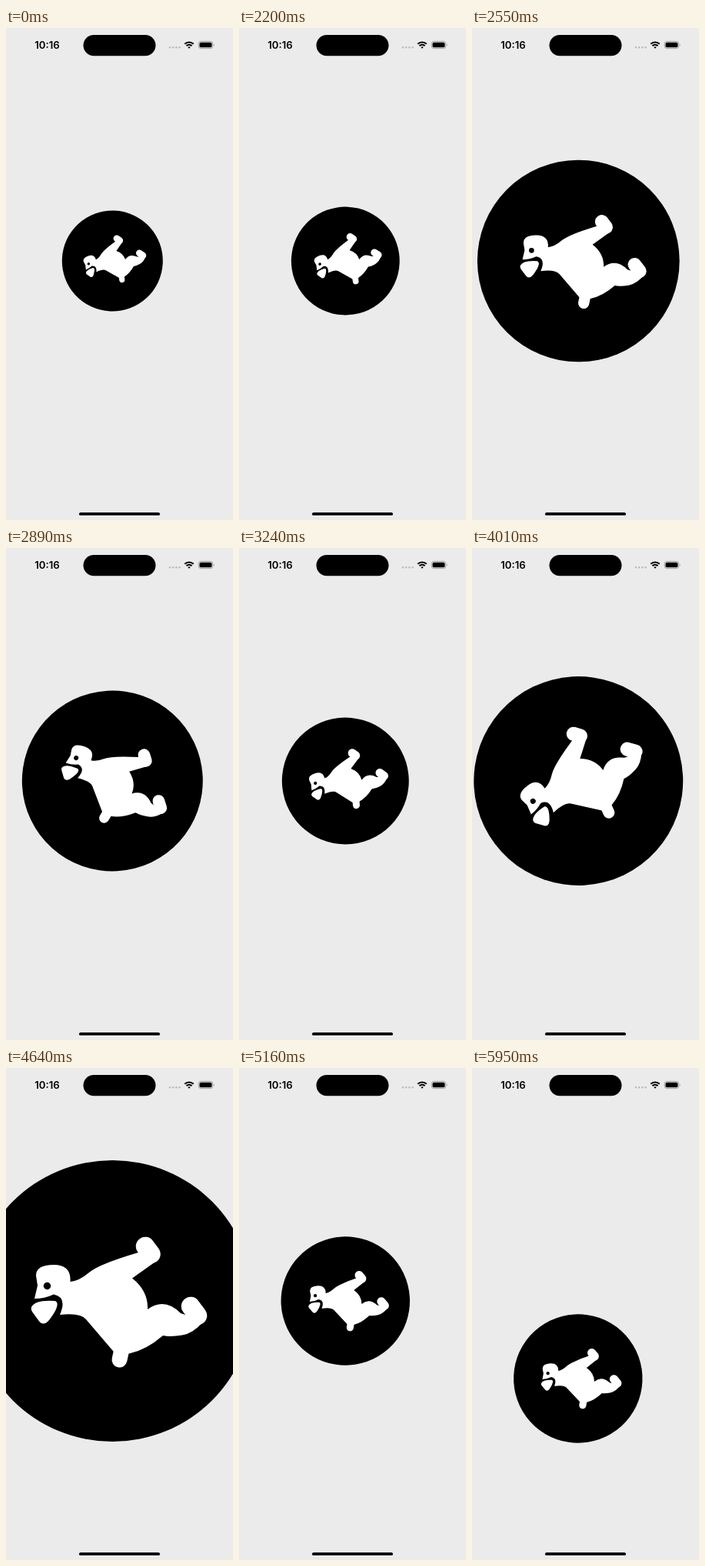
An HTML page that plays this animation: 295x640 px, repeating every 7.01 s.

```html
<!DOCTYPE html>
<html lang="en">
<head>
<meta charset="utf-8">
<title>Pinch, rotate and drag</title>
<style>
  html, body { margin: 0; width: 100%; height: 100%; overflow: hidden; background: #ebebeb; }
  svg { display: block; width: 100%; height: 100%; }
  text { font: 600 13.2px Inter, "Liberation Sans", sans-serif; }
  .limb { fill: none; stroke: #fff; stroke-linecap: round; }
</style>
</head>
<body>
<svg viewBox="0 0 295 640">
  <g id="badge">
    <circle r="183"/>
    <g transform="translate(-138.3 -303)" fill="#fff">
      <!-- head, torso, leg and belly -->
      <path d="M37 300L41 283L39 270Q39 256 62 256T83.500 278Q95 277 108 266T172 240
        L197 250L164 273.500Q185 290 184 314Q206 298 227 319L257 329
        Q244 345 229 347.500T204 348Q182 367 160 371.500H142L104 327
        Q97 318 70 321Q80 298 62 294.500Q50 300 37 300"/>
      <path class="limb" stroke-width="24.500" d="M181 232L188.500 242M240 310L249 322"/>
      <path class="limb" stroke-width="20" d="M150 368L147.500 379.500"/>
      <!-- muzzle and eye -->
      <path d="M33 311Q38 301 64 303Q72 307 56 328Q48 337 42 328L34 317Q32 314 33 311"/>
      <circle cx="53.500" cy="283.500" r="4.700" fill="#000"/>
    </g>
  </g>

  <text x="37.300" y="27">10:16</text>
  <rect x="100.500" y="9" width="94" height="27.200" rx="13.600"/>
  <path d="M213 25.200h13" stroke="#b9b9b9" stroke-width="2.600" stroke-linecap="round" stroke-dasharray="0 4.200"/>
  <g fill="none" stroke="#000" stroke-width="2.100">
    <path d="M232.300 20.800a8.200 8.200 0 0 1 11.400 0M234.500 23.300a5 5 0 0 1 7 0"/>
    <path d="M236.300 25.100a2.500 2.500 0 0 1 3.400 0L238 26.800Z" fill="#000" stroke="none"/>
  </g>
  <rect x="250.200" y="17.400" width="18.600" height="9.200" rx="3" fill="none" stroke="#999" stroke-width=".9"/>
  <rect x="251.500" y="18.700" width="16" height="6.600" rx="1.900"/>
  <path d="M270 20.300q1.600 1.700 0 3.400z" fill="#999"/>
  <rect x="95" y="630.300" width="105" height="3.700" rx="1.850"/>
</svg>
<script>
const LOOP = 7010;
const badge = document.getElementById("badge");

// Smooth 0 to 1 between two times.
function ramp(t, start, end) {
  const p = Math.min(1, Math.max(0, (t - start) / (end - start)));
  return p * p * (3 - 2 * p);
}

// Each gesture is redrawn at its own steady, coarse rate.
const stepped = (t, start, period) => start + Math.floor((t - start) / period + 0.01) * period;

function draw() {
  const now = performance.now() % LOOP;
  const pinch = stepped(now, 2200, 112.6);
  const shrink = stepped(now, 4640, 104);
  const drag = stepped(now, 5520, 107.5);

  const radius = 65.5
    + 67.5 * ramp(pinch, 2125, 2580)
    - 70 * ramp(pinch, 2580, 3550)
    + 120 * ramp(pinch, 3550, 4339)
    - 79 * ramp(shrink, 4640, 4840)
    - 20.3 * ramp(shrink, 4952, 5160);
  const angle = -20
    + 39.5 * ramp(pinch, 2200, 2876)
    - 93.5 * ramp(pinch, 2876, 3664)
    + 74 * ramp(pinch, 3664, 4339)
    - 3 * ramp(shrink, 4640, 5160);
  const moved = ramp(drag, 5470, 5930);

  badge.setAttribute("transform",
    `translate(${138.3 - 0.5 * moved} ${303 + 101 * moved}) rotate(${angle}) scale(${radius / 183})`);
  requestAnimationFrame(draw);
}
draw();
</script>
</body>
</html>
```
